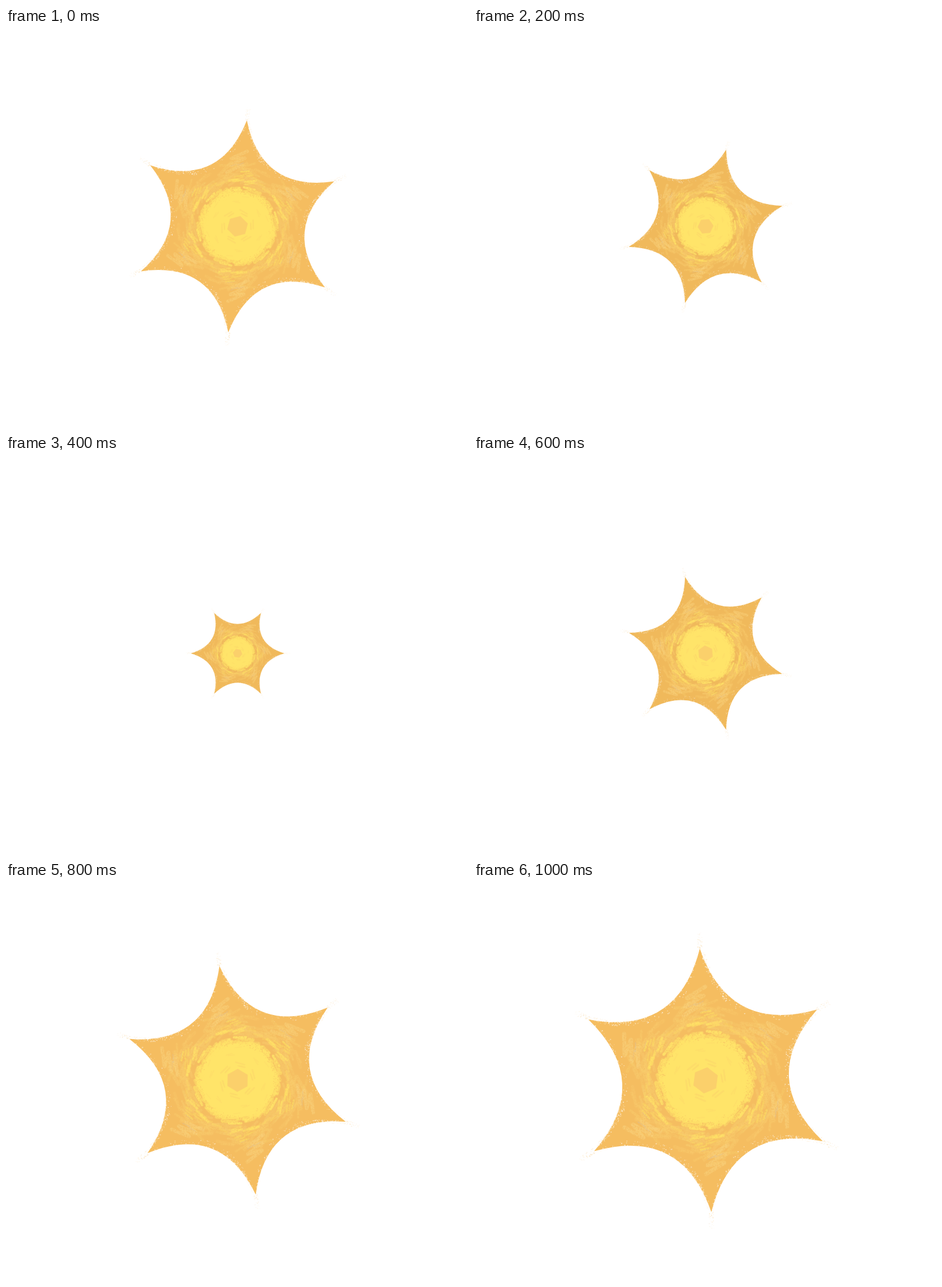
An HTML page with a canvas for the animation above (1.2 s loop, 804 by 696 pixels).

```html
<!DOCTYPE html>
<html lang="en">
<head>
<meta charset="utf-8">
<title>Crayon star</title>
<style>
  html, body { margin: 0; width: 100%; height: 100%; overflow: hidden; background: #fff; }
  canvas { display: block; }
</style>
</head>
<body>
<canvas id="stage" width="804" height="696"></canvas>
<script>
const ctx = document.getElementById('stage').getContext('2d');
const TAU = Math.PI * 2;
const CX = 403, CY = 346;
const TIP = 230, PULL = 91;
const STEP = 200;

// scale, turn in degrees
const POSES = [[0.807, 5], [0.602, 15], [0.354, 30], [0.6, 45], [0.877, 51], [1, 57.5]];

const HALF = 270, RES = 2;

let seed = 11;
function rnd(a = 0, b = 1) {
  seed = (seed * 1664525 + 1013904223) >>> 0;
  return a + (b - a) * seed / 4294967296;
}

function layer() {
  const c = document.createElement('canvas');
  c.width = c.height = HALF * 2 * RES;
  const g = c.getContext('2d');
  g.scale(RES, RES);
  g.translate(HALF, HALF);
  g.lineCap = g.lineJoin = 'round';
  return g;
}

// Polar point, angle measured clockwise from straight up
function polar(r, deg) {
  const a = deg * TAU / 360;
  return [r * Math.sin(a), -r * Math.cos(a)];
}

function starPath(g) {
  g.beginPath();
  g.moveTo(...polar(TIP, 0));
  for (let i = 0; i < 6; i++) {
    g.quadraticCurveTo(...polar(PULL, i * 60 + 30), ...polar(TIP, i * 60 + 60));
  }
  g.closePath();
}

function sixfold(g, src) {
  for (let i = 0; i < 6; i++) {
    g.save();
    g.rotate(i * TAU / 6);
    g.drawImage(src.canvas, -HALF, -HALF, HALF * 2, HALF * 2);
    g.restore();
  }
}

function dash(g, x, y, len, tilt, width, color, alpha) {
  const dx = Math.cos(tilt) * len / 2, dy = Math.sin(tilt) * len / 2;
  g.globalAlpha = alpha;
  g.strokeStyle = color;
  g.lineWidth = width;
  g.beginPath();
  g.moveTo(x - dx, y - dy);
  g.lineTo(x + dx, y + dy);
  g.stroke();
}

function dashes(g, n, turn, near, far, side, len, width, color, alpha) {
  g.save();
  g.rotate(turn * TAU / 360);
  for (let i = 0; i < n; i++) {
    dash(g, rnd(-side, side), -rnd(near, far), len * rnd(0.6, 1.2),
      -0.22 + rnd(-0.2, 0.2), width * rnd(0.6, 1.1), color, alpha * rnd(0.6, 1));
  }
  g.restore();
}

function zigzag(g, x, y, w, h, rows, color, width) {
  g.globalAlpha = 0.75;
  g.strokeStyle = color;
  g.lineWidth = width;
  g.beginPath();
  for (let i = 0; i <= rows; i++) {
    const k = i / rows, s = i % 2 ? -1 : 1;
    g.lineTo(x + s * w / 2 - k * 9, y + k * h - s * w * 0.17);
  }
  g.stroke();
}

function grain(g, n, near, far, min, max) {
  g.globalCompositeOperation = 'destination-out';
  for (let i = 0; i < n; i++) {
    const [x, y] = polar(near + (far - near) * Math.sqrt(rnd()), rnd(0, 360));
    const s = rnd(min, max);
    g.globalAlpha = rnd(0.5, 1);
    g.fillRect(x, y, s, s);
  }
  g.globalCompositeOperation = 'source-over';
  g.globalAlpha = 1;
}

function paleBand() {
  const s = layer(), out = layer();
  dashes(s, 30, 30, 84, 126, 62, 36, 6, '#f8cb6c', 0.6);
  dashes(s, 12, 0, 95, 145, 34, 28, 5, '#f9cd6c', 0.55);
  zigzag(s, -9, -158, 31, 38, 5, '#f9cf78', 7);
  dashes(s, 3, -4, 118, 150, 20, 14, 2, '#dcbf98', 0.6);
  sixfold(out, s);
  grain(out, 22000, 78, 172, 0.6, 1.5);
  return out;
}

function yellowCore() {
  const s = layer(), out = layer();
  dashes(s, 14, 30, 66, 86, 34, 28, 7, '#ffe469', 0.9);
  dashes(s, 9, 0, 74, 100, 20, 22, 6, '#ffe268', 0.85);
  dashes(s, 6, 0, 98, 120, 18, 20, 4, '#fede62', 0.75);
  dashes(s, 6, 30, 88, 108, 46, 22, 4, '#fddc66', 0.6);
  out.fillStyle = '#ffe469';
  out.beginPath();
  out.arc(0, 0, 74, 0, TAU);
  out.fill();
  sixfold(out, s);
  grain(out, 9000, 68, 128, 0.6, 1.5);
  return out;
}

function heart() {
  const s = layer(), out = layer();
  dashes(s, 3, 30, 28, 38, 11, 15, 3, '#fcd76a', 0.7);
  dashes(s, 3, 10, 44, 68, 20, 12, 3, '#fcd96a', 0.5);
  sixfold(out, s);
  out.fillStyle = '#fbd06b';
  out.beginPath();
  for (let i = 0; i < 6; i++) out.lineTo(...polar(23, i * 60 + 10));
  out.closePath();
  out.fill();
  return out;
}

// White flecks inside the edge and loose dust past the tips
function flecks() {
  const out = layer();
  for (let i = 0; i < 6; i++) {
    const a = polar(TIP, 0), c = polar(PULL, 30), b = polar(TIP, 60);
    out.save();
    out.rotate(i * TAU / 6);
    for (let j = 0; j < 170; j++) {
      const t = rnd() < 0.5 ? rnd(0.03, 0.36) : rnd(0.03, 0.97), u = 1 - t;
      const x = u * u * a[0] + 2 * u * t * c[0] + t * t * b[0];
      const y = u * u * a[1] + 2 * u * t * c[1] + t * t * b[1];
      const inset = 1 - Math.pow(rnd(), 2.5) * 13 / Math.hypot(x, y);
      const s = rnd(0.6, 1.6);
      out.globalAlpha = rnd(0.45, 1);
      out.fillStyle = rnd() < 0.7 ? '#fff' : '#fbe3b8';
      out.fillRect(x * inset, y * inset, s, s);
    }
    for (let j = 0; j < 90; j++) {
      const r = rnd(196, 259), side = rnd() < 0.5 ? -1 : 1;
      const edge = Math.max(0, TIP - r) * 0.33;
      const s = rnd(0.6, 1.5);
      out.globalAlpha = rnd(0.15, 0.6) * (r > TIP ? 1 - (r - TIP) / 40 : 0.5);
      out.fillStyle = rnd() < 0.75 ? '#f5bd60' : '#eadccf';
      out.fillRect(side * (edge + rnd(0, 4.5)), -r, s, s);
    }
    out.restore();
  }
  return out;
}

const texture = layer();
for (const part of [paleBand(), yellowCore(), heart(), flecks()]) {
  texture.drawImage(part.canvas, -HALF, -HALF, HALF * 2, HALF * 2);
}

function draw(index) {
  const [scale, turn] = POSES[index];
  ctx.fillStyle = '#fff';
  ctx.fillRect(0, 0, 804, 696);
  ctx.save();
  ctx.translate(CX, CY);
  ctx.rotate(turn * TAU / 360);
  ctx.scale(scale, scale);
  ctx.fillStyle = scale < 0.7 ? '#f0b95b' : '#f5bd60';
  starPath(ctx);
  ctx.fill();
  ctx.imageSmoothingQuality = 'high';
  ctx.drawImage(texture.canvas, -HALF, -HALF, HALF * 2, HALF * 2);
  ctx.restore();
}

const start = performance.now();
let shown = -1;
function tick() {
  const index = Math.floor((performance.now() - start) / STEP) % POSES.length;
  if (index !== shown) draw(shown = index);
  requestAnimationFrame(tick);
}
tick();
</script>
</body>
</html>
```
